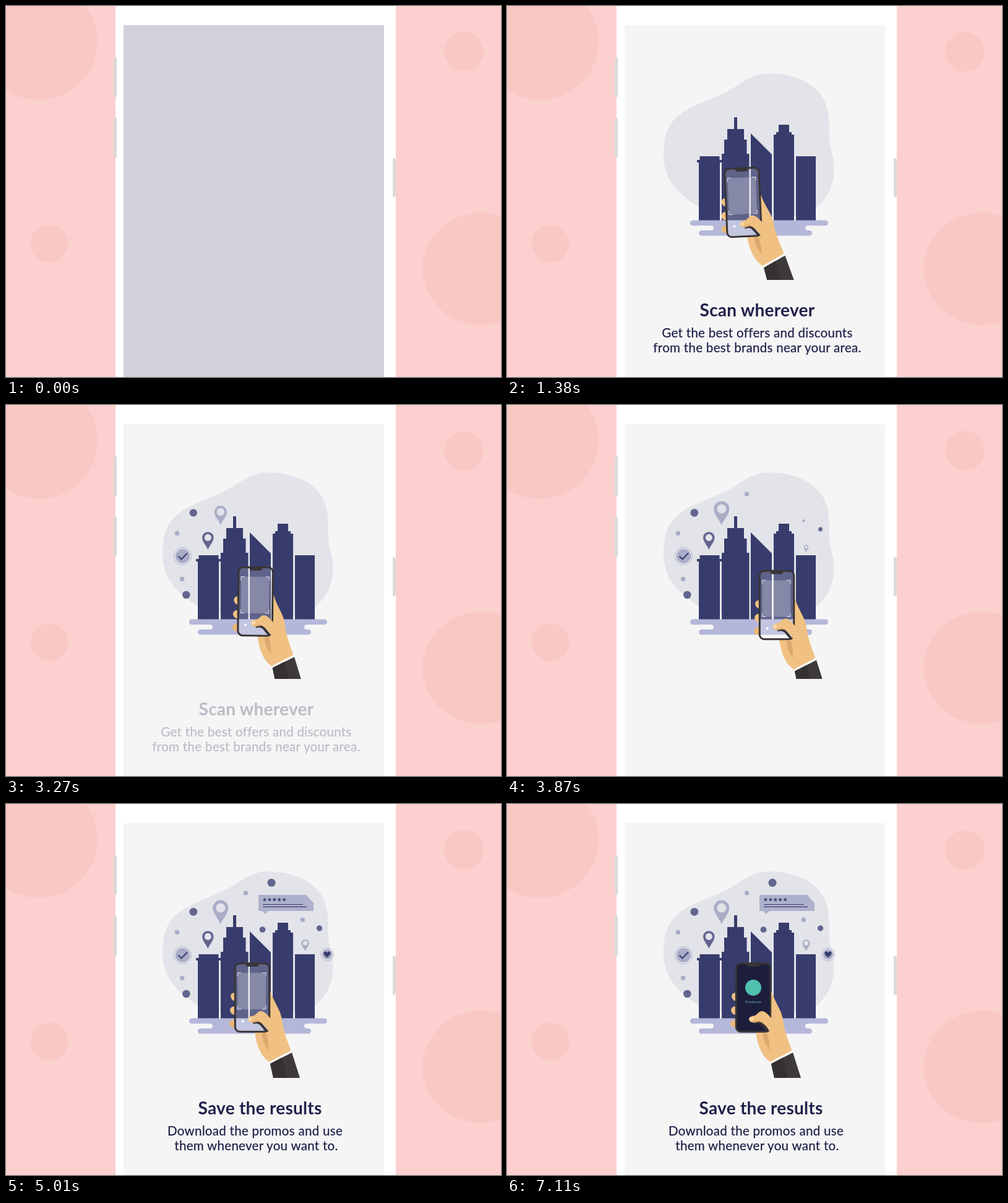
An HTML page that plays this animation: 800x600 px, repeating every 7470 ms.

```html
<!DOCTYPE html>
<html lang="en">
<head>
<meta charset="utf-8">
<title>Onboarding</title>
<style>
  html, body { margin: 0; width: 100%; height: 100%; overflow: hidden; background: #fcd0ce; }
  svg { display: block; width: 100%; height: 100%; }
  text { font-family: Lato, "Open Sans", sans-serif; fill: #20224a; text-anchor: middle; }
  .title { font-size: 28px; font-weight: 700; letter-spacing: .25px; }
  .sub { font-size: 20.5px; letter-spacing: .3px; stroke: #20224a; stroke-width: .25px; }
</style>
</head>
<body>
<svg viewBox="0 0 800 600" xmlns="http://www.w3.org/2000/svg">
  <defs>
    <clipPath id="screenClip"><rect x="190" y="31" width="421" height="569"/></clipPath>
    <clipPath id="handClip"><rect x="190" y="31" width="421" height="412"/></clipPath>
  </defs>

  <rect width="800" height="600" fill="#fcd0ce"/>
  <g fill="#fac8c4">
    <circle cx="53" cy="57" r="95"/>
    <circle cx="70" cy="384" r="30.5"/>
    <circle cx="740" cy="74" r="32"/>
    <ellipse cx="768" cy="425" rx="95" ry="91"/>
  </g>
  <rect x="177" width="453" height="600" fill="#fff"/>
  <g fill="#dadada">
    <path d="M179 83h-2q-3 0-3 4v56q0 4 3 4h2z"/>
    <path d="M179 181h-2q-3 0-3 4v56q0 4 3 4h2z"/>
    <path d="M625 246h2q3 0 3 4v55q0 4-3 4h-2z"/>
  </g>
  <rect x="190" y="31" width="421" height="569" fill="#f5f5f5"/>

  <g clip-path="url(#screenClip)">
    <path id="blob" d="M423 109C465 109 500 125 514 155C526 185 516 205 525 238C534 272 526 305 499 327C470 350 340 350 309 325C280 305 253 285 253 240C253 205 262 185 290 168C320 152 345 146 370 130C390 116 405 109 423 109Z"/>
    <g id="icons"></g>
    <g id="city" fill="#373c6d">
      <path d="M310 347V253H307V249H311.500V243H343.500V249H348V253H344V347Z"/>
      <path d="M347 347V239H351V216H356V199H367V180H372V199H383V216H387.500V239H391.500V347Z"/>
      <path d="M394 347V206L428 240V347Z"/>
      <path d="M431 347V208H435V204H439V192H456V204H460V208H464V347Z"/>
      <path d="M467 347V243H499V347Z"/>
    </g>
    <g id="ground" fill="#b4b7d9">
      <rect x="296" y="346.500" width="223" height="8.700" rx="4.300"/>
      <rect x="310" y="363" width="183" height="8.500" rx="4.200"/>
      <rect x="326" y="354" width="164" height="10"/>
      <g fill="#f5f5f5">
        <rect x="308" y="355.200" width="26" height="7.800" rx="3.900"/>
        <rect x="482" y="355.200" width="20" height="7.800" rx="3.900"/>
      </g>
    </g>

    <g id="scanner" clip-path="url(#handClip)">
      <g class="hand">
        <g fill="#f0c182">
          <path d="M-27-8q-8 0-8 6q1 7 8 8z"/>
          <path d="M-27 14q-9 0-9 7q1 7 9 7z"/>
          <path d="M-27 36q-10 0-10 7q2 6 10 6z" fill="#ecb774"/>
          <path d="M27-14L30-9C35 8 46 20 48 36C50 54 57 70 63 88L29 105C16 98 7 80 4 55H27Z"/>
        </g>
        <path d="M15 58C17 70 20 80 30 88C24 86 28 78 23 58Z" fill="#dda96e"/>
        <path d="M29 107L64 89L77 130L90 170H42L34 130Z" fill="#3e3a39"/>
        <path d="M29 107L48 97L56 130L66 170H42L34 130Z" fill="#353130"/>
        <path d="M28.500 105L63.500 87" stroke="#fff" stroke-width="3"/>
      </g>
      <g id="phone">
        <rect x="-27" y="-55" width="54" height="110" rx="7" fill="#fff" fill-opacity=".2"/>
        <rect x="-23.500" y="-40" width="45.500" height="59" fill="#fff" fill-opacity=".24"/>
        <path d="M-23.500-34v-6h6M16-40h6v6M22 13v6h-6M-17.500 19h-6v-6" fill="none" stroke="#dcdeeb" stroke-width="1"/>
        <circle cx="-15.500" cy="38" r="2" fill="#fff"/>
        <g id="lock">
          <rect x="-28" y="-55.500" width="56" height="111" rx="7" fill="#1d1e3c"/>
          <circle id="mark" cy="-16" r="13" fill="#4fc0ae"/>
          <text id="brand" y="9" style="font-size:5.800px;fill:#58aeb2">Fundmoor</text>
        </g>
        <rect x="-27.700" y="-55.200" width="55.400" height="110.400" rx="7.500" fill="none" stroke="#393536" stroke-width="3"/>
        <path d="M-11-55H11L9.500-51Q9-50 7-50H-7Q-9-50-9.500-51Z" fill="#393536"/>
      </g>
      <g class="hand">
        <path d="M1 41Q9 38 14 43L23 54" fill="none" stroke="#393536" stroke-width="4"/>
        <path d="M-7 35C-7 31-2 30 3 29C7 27 9 22 14 22C20 22 25 29 29 33L36 34V60L28 58C25 52 20 44 13 40C8 37 4 42-2 40Q-7 39-7 35Z" fill="#f0c182"/>
        <path d="M-6 36Q-6 32-1 32Q1 34-1 37Q-4 38-6 36Z" fill="#f9dcb2"/>
        <path d="M-2 40C4 42 8 37 13 40Q8 35 2 38Z" fill="#dda96e"/>
      </g>
    </g>

    <g id="copy1">
      <text class="title" x="404.500" y="501.500">Scan wherever</text>
      <text class="sub" x="404.500" y="536">Get the best offers and discounts</text>
      <text class="sub" x="404.500" y="560">from the best brands near your area.</text>
    </g>
    <g id="copy2">
      <text class="title" x="410.500" y="501.500">Save the results</text>
      <text class="sub" x="402.500" y="536">Download the promos and use</text>
      <text class="sub" x="404.500" y="560">them whenever you want to.</text>
    </g>
  </g>
</svg>

<script>
const LOOP = 7470;
const NAVY = '#373c6d', DARK = '#62668f', LIGHT = '#aaadc7';
const $ = id => document.getElementById(id);
const set = (el, transform) => el.setAttribute('transform', transform);
const fade = (el, v) => el.setAttribute('opacity', v);
const ramp = (t, from, to) => Math.min(1, Math.max(0, (t - from) / (to - from)));
const easeOut = u => 1 - (1 - u) ** 3;
const smooth = u => u * u * (3 - 2 * u);
const mix = (a, b, u) => a + (b - a) * u;

// Icons are drawn around their own anchor, then popped in by scale.
const dot = (r, fill) => `<circle r="${r}" fill="${fill}"/>`;
const pin = (size, fill) => `<path transform="scale(${size})" fill="${fill}" fill-rule="evenodd"
  d="M0 0C-3-9-12.500-17-12.500-26.500A12.500 12.500 0 1 1 12.500-26.500C12.500-17 3-9 0 0ZM-7.500-26.500a7.500 7.500 0 1 0 15 0a7.500 7.500 0 1 0-15 0Z"/>`;
const badge = (r, inner, glyph) =>
  `<circle r="${r}" fill="#ecedf2" stroke="${LIGHT}"/><circle r="${inner}" fill="${LIGHT}"/>${glyph}`;
const star = (x, y) => {
  const pts = Array.from({ length: 10 }, (_, i) => {
    const a = Math.PI * (i / 5 - .5), r = i % 2 ? 1.5 : 3.4;
    return (x + r * Math.cos(a)).toFixed(2) + ',' + (y + r * Math.sin(a)).toFixed(2);
  });
  return `<polygon points="${pts.join(' ')}" fill="${NAVY}"/>`;
};
const check = `<path d="M-7 0L-2 5L7.500-5" fill="none" stroke="${NAVY}" stroke-width="2"/>`;
const heart = `<path d="M0 5C-9-1-5-6-2-4.500Q-.5-4 0-2.500Q.5-4 2-4.500C5-6 9-1 0 5Z" fill="${NAVY}"/>`;
const bubble = `<path d="M-11-31H66L78-18V-5H5L0 0L-5-5H-11Z" fill="#aeb1cb"/>
  ${[0, 1, 2, 3, 4].map(i => star(-1 + i * 7.9, -23.3)).join('')}
  <path d="M-4-15.500H61M-4-11.700H67" stroke="${NAVY}" stroke-width="1.200"/>`;

// x, y, start time, drawing
const icons = [
  [276.5, 207.5, 2650, dot(3.7, LIGHT)],
  [285.5, 244.5, 2680, badge(14, 11.8, check)],
  [284.7, 281.5, 2700, dot(3.7, LIGHT)],
  [291.3, 307, 2740, dot(6.3, DARK)],
  [326.3, 234, 2850, pin(.74, DARK)],
  [302.8, 174.3, 3040, dot(6.4, DARK)],
  [346.8, 194.5, 3120, pin(1, LIGHT)],
  [387.5, 144, 3250, dot(3.7, LIGHT)],
  [506.5, 201, 3750, dot(4.7, DARK)],
  [479.5, 187.3, 3780, dot(3.7, LIGHT)],
  [483.5, 238, 3775, pin(.49, LIGHT)],
  [414.5, 203.2, 3890, dot(4.9, DARK)],
  [429, 127.3, 3960, dot(6.5, DARK)],
  [419, 178, 4020, bubble],
  [519, 243.3, 4180, badge(10.3, 8.3, heart)]
].map(([x, y, start, art]) => {
  const el = document.createElementNS('http://www.w3.org/2000/svg', 'g');
  el.innerHTML = art;
  $('icons').append(el);
  return { el, x, y, start };
});

// time, x, y, scale, angle, extra phone tilt
const poses = [
  [290, 433, 405, .4, 24, 1.6],
  [510, 416, 345, .78, 10, 1],
  [850, 389, 318, 1, 0, 0],
  [1380, 381.5, 317.5, 1, -2.5, 0],
  [1750, 377, 318, 1, -3, 0],
  [2580, 387, 316, 1, 1, 0],
  [3000, 389, 315.5, 1, 1, 0],
  [3780, 436, 323.5, 1, 0, 0],
  [3920, 436, 323.5, 1, 0, 0],
  [4720, 398, 313, 1, 0, 0]
];

// Monotone cubic through the poses, column c.
function track(t, c) {
  const last = poses.length - 1;
  if (t <= poses[0][0]) return poses[0][c];
  if (t >= poses[last][0]) return poses[last][c];
  const i = poses.findIndex(p => p[0] > t) - 1;
  const rise = k => (poses[k + 1][c] - poses[k][c]) / (poses[k + 1][0] - poses[k][0]);
  const slope = k => {
    if (k === 0) return rise(0);
    if (k === last) return 0;
    const a = rise(k - 1), b = rise(k);
    return a * b <= 0 ? 0 : 2 * a * b / (a + b);
  };
  const h = poses[i + 1][0] - poses[i][0], u = (t - poses[i][0]) / h, s = smooth(u);
  return mix(poses[i][c], poses[i + 1][c], s)
    + h * u * (1 - u) * ((1 - u) * slope(i) - u * slope(i + 1));
}

const hands = document.querySelectorAll('.hand');
const buildings = [...$('city').children];

function draw(t) {
  const shrink = easeOut(ramp(t, 30, 460));
  const size = mix(6, 1, shrink);
  set($('blob'), `translate(390 225) scale(${size}) translate(-390 -225)`);
  $('blob').setAttribute('fill',
    `rgb(${mix(208, 227, shrink)},${mix(209, 228, shrink)},${mix(219, 233, shrink)})`);

  buildings.forEach((el, i) => {
    const grow = easeOut(ramp(t, 120 + i * 25, 390 + i * 25));
    set(el, `translate(0 347) scale(1 ${grow}) translate(0 -347)`);
  });
  set($('ground'), `translate(407 0) scale(${easeOut(ramp(t, 90, 360))} 1) translate(-407 0)`);

  const [x, y, s, r, tilt] = [1, 2, 3, 4, 5].map(c => track(t, c));
  hands.forEach(el => set(el, `translate(${x} ${y}) rotate(${r}) scale(${s})`));
  set($('phone'), `translate(${x + 2.5 * tilt} ${y + 1.5 * tilt}) rotate(${r + 8.5 * tilt}) scale(${s * (1 - .12 * tilt)})`);
  fade($('scanner'), ramp(t, 290, 400));

  for (const { el, x, y, start } of icons)
    set(el, `translate(${x} ${y}) scale(${easeOut(ramp(t, start, start + 350))})`);

  fade($('copy1'), smooth(ramp(t, 850, 1250)) * (1 - smooth(ramp(t, 3020, 3400))));
  fade($('copy2'), smooth(ramp(t, 3950, 4400)));

  fade($('lock'), smooth(ramp(t, 5020, 5350)));
  set($('mark'), `translate(0 -16) scale(${easeOut(ramp(t, 5250, 5700))}) translate(0 16)`);
  fade($('brand'), smooth(ramp(t, 5500, 6000)));
}

const start = performance.now();
function tick() {
  draw((performance.now() - start) % LOOP);
  requestAnimationFrame(tick);
}
draw(0);
requestAnimationFrame(tick);
</script>
</body>
</html>
```
